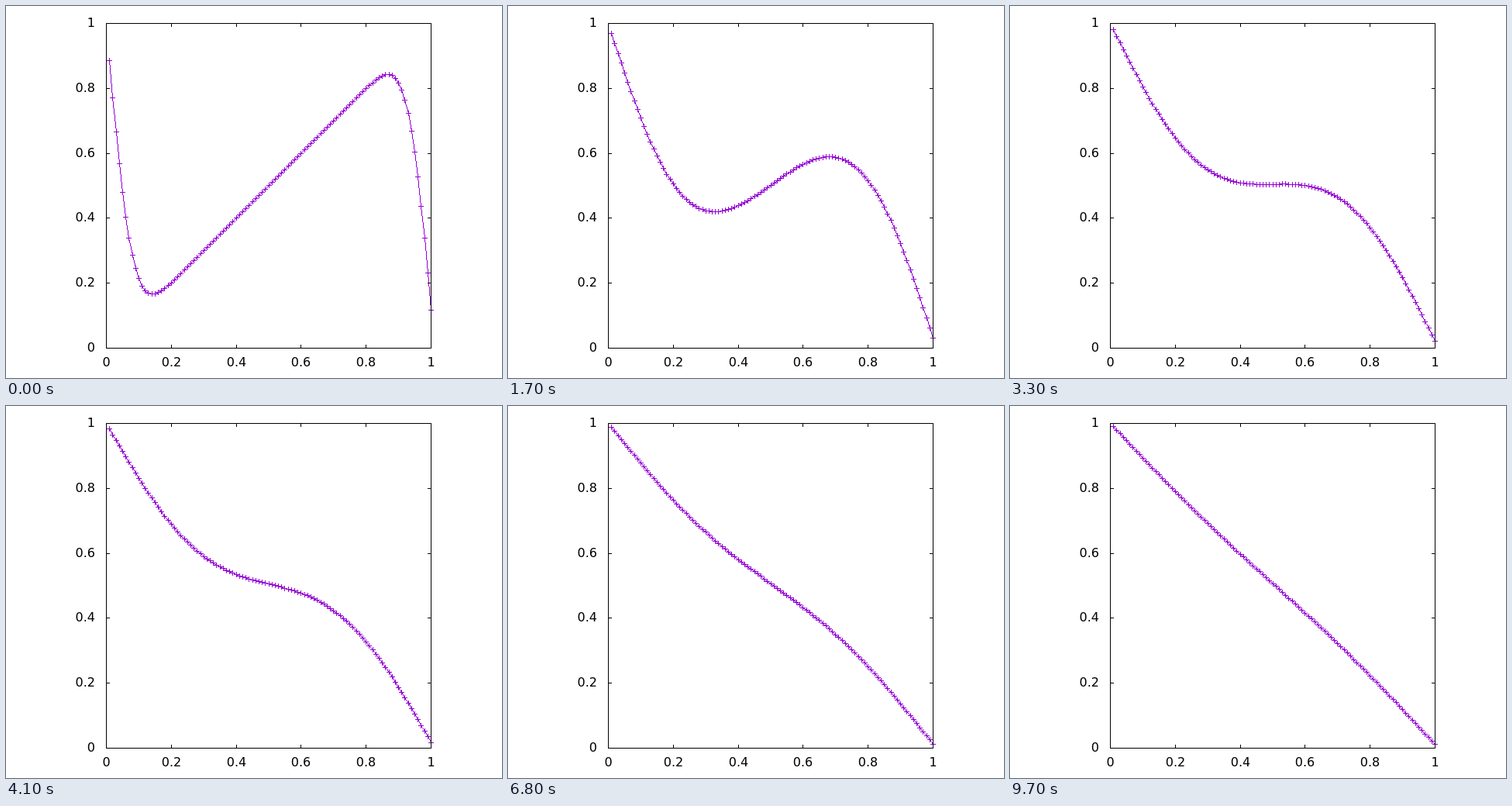
An HTML page with a canvas that plays this animation: 640x480 px, repeating every 9800 ms.

```html
<!DOCTYPE html>
<html lang="en">
<head>
<meta charset="utf-8">
<title>Heat diffusion</title>
<style>
html, body { margin: 0; width: 100%; height: 100%; overflow: hidden; background: #fff; }
canvas { display: block; }
</style>
</head>
<body>
<canvas id="plot" width="640" height="480"></canvas>
<script>
const ctx = document.getElementById('plot').getContext('2d');
const LEFT = 129, TOP = 22, SIZE = 419, RIGHT = LEFT + SIZE, BOTTOM = TOP + SIZE;
const STEP_MS = 100, STEPS = 98, POINTS = 100, LENGTH = 1.01, TERMS = 40;

const px = x => LEFT + Math.round(SIZE * x);
const py = y => BOTTOM - Math.round(SIZE * y);

// Heat equation with ends held at 1 and 0, starting from u = x (Fourier series).
function heat(x, time) {
  const s = x / LENGTH;
  let u = 1 - s;
  for (let n = 1; n <= TERMS; n++) {
    const k = n * Math.PI;
    const amplitude = -2 / k * (1 + LENGTH * (n % 2 ? -1 : 1));
    u += amplitude * Math.sin(k * s) * Math.exp(-k * k * time / LENGTH ** 2);
  }
  return u;
}

// Line without antialiasing.
function crispLine([x0, y0], [x1, y1]) {
  const count = Math.max(Math.abs(x1 - x0), Math.abs(y1 - y0));
  for (let i = 0; i <= count; i++) {
    const f = count ? i / count : 0;
    ctx.fillRect(Math.round(x0 + (x1 - x0) * f), Math.round(y0 + (y1 - y0) * f), 1, 1);
  }
}

function drawCurve(time) {
  ctx.fillStyle = '#9400d3';
  let previous;
  for (let i = 1; i <= POINTS; i++) {
    const x = i / POINTS;
    const point = [px(x), py(heat(x, time))];
    if (previous) crispLine(previous, point);
    ctx.fillRect(point[0] - 3, point[1], 7, 1);
    ctx.fillRect(point[0], point[1] - 3, 1, 7);
    previous = point;
  }
}

function drawAxes() {
  ctx.fillStyle = '#000';
  ctx.strokeStyle = '#000';
  ctx.strokeRect(LEFT + 0.5, TOP + 0.5, SIZE, SIZE);
  ctx.font = '16px "DejaVu Sans", sans-serif';
  for (let i = 0; i <= 5; i++) {
    const value = i / 5, x = px(value), y = py(value);
    ctx.fillRect(x, TOP, 1, 5);
    ctx.fillRect(x, BOTTOM - 4, 1, 5);
    ctx.fillRect(LEFT, y, 5, 1);
    ctx.fillRect(RIGHT - 4, y, 5, 1);
    ctx.textAlign = 'center';
    ctx.fillText(value, x + 0.5, 465);
    ctx.textAlign = 'right';
    ctx.fillText(value, 115, y + 5);
  }
}

function render() {
  const step = Math.floor(performance.now() / STEP_MS) % STEPS;
  ctx.fillStyle = '#fff';
  ctx.fillRect(0, 0, 640, 480);
  drawCurve(0.001 * (step + 2));
  drawAxes();
  requestAnimationFrame(render);
}
render();
</script>
</body>
</html>
```
